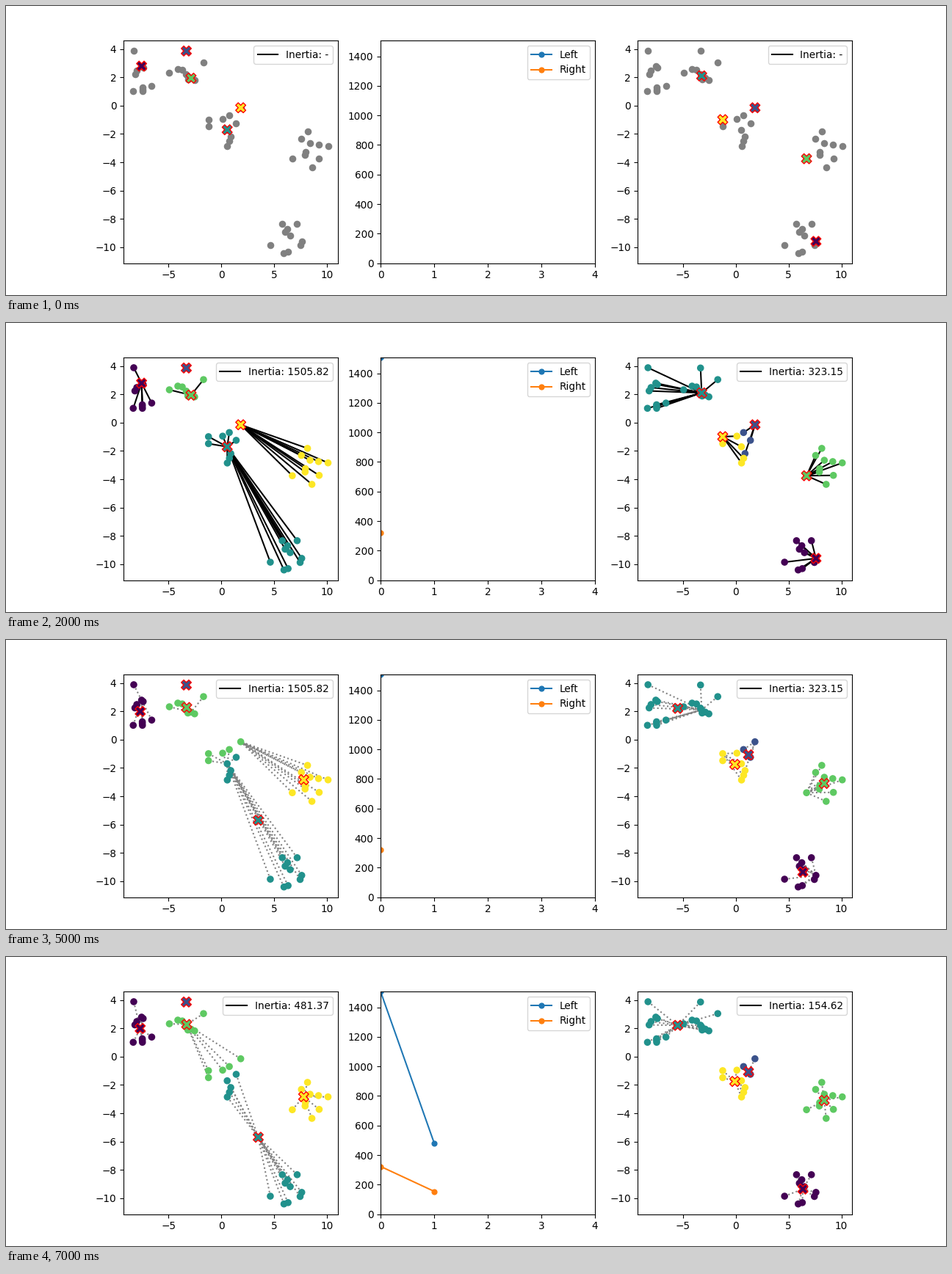
A matplotlib script for the animation above (8000 ms loop, 1280 by 394 pixels).

```python
import numpy as np
import matplotlib.pyplot as plt
from matplotlib.animation import FuncAnimation

W, H = 1280, 394
DPI = W / 13
K = 5

POINTS = np.array([
    # upper left
    (-8.30, 3.89), (-7.56, 2.80), (-7.41, 2.70), (-8.01, 2.49), (-8.19, 2.25),
    (-7.49, 1.27), (-7.49, 1.16), (-7.48, 1.02), (-8.35, 1.02), (-6.60, 1.39),
    # upper middle
    (-3.33, 3.87), (-1.70, 3.05), (-4.93, 2.33), (-4.13, 2.59), (-3.71, 2.53),
    (-3.33, 2.23), (-3.22, 2.11), (-3.18, 1.89), (-2.88, 1.95), (-2.54, 1.83),
    # centre
    (-1.23, -0.985), (-1.23, -1.48), (0.11, -0.95), (0.74, -0.695), (1.39, -1.245),
    (0.54, -1.70), (0.88, -2.18), (0.75, -2.515), (0.55, -2.85), (1.82, -0.145),
    # right
    (8.14, -1.815), (7.56, -2.315), (8.38, -2.655), (9.18, -2.75), (10.08, -2.84),
    (7.94, -3.25), (7.91, -3.485), (6.70, -3.75), (9.24, -3.725), (8.555, -4.36),
    # lower right
    (5.75, -8.345), (7.16, -8.345), (6.25, -8.70), (6.02, -8.945), (6.50, -9.19),
    (7.59, -9.595), (7.44, -9.885), (4.62, -9.865), (6.30, -10.32), (5.91, -10.415),
])

# Steps of the loop: round of the labels, of the centres, of the links, link style
STEPS = [
    (None, 0, None, None),
    (0, 0, None, None),
    (0, 0, 0, "solid"),
    (0, 0, 0, "dotted"),
    (0, 1, 0, "dotted"),
    (1, 1, 0, "dotted"),
    (1, 1, 1, "solid"),
    (1, 1, 1, "dotted"),
]


def kmeans(seeds, rounds=2):
    """Return the centres and labels of each round."""
    centres, history = POINTS[seeds], []
    for _ in range(rounds):
        dist = np.linalg.norm(POINTS[:, None] - centres, axis=2)
        labels = dist.argmin(axis=1)
        history.append((centres, labels))
        centres = np.array([POINTS[labels == k].mean(axis=0) for k in range(K)])
    return history


RUNS = [
    dict(name="Left", history=kmeans([1, 10, 25, 18, 29]), inertia=[1505.82, 481.37]),
    dict(name="Right", history=kmeans([45, 29, 16, 37, 20]), inertia=[323.15, 154.62]),
]

fig, (ax_left, ax_mid, ax_right) = plt.subplots(
    1, 3, figsize=((W + 1e-6) / DPI, (H + 1e-6) / DPI), dpi=DPI)


def draw_clusters(ax, run, step):
    label_round, centre_round, link_round, style = step
    history = run["history"]
    cmap = dict(cmap="viridis", vmin=0, vmax=K - 1)
    ax.clear()

    text = "-"
    if link_round is not None:
        text = f"{run['inertia'][link_round]:.2f}"
        centres, labels = history[link_round]
        color = "black" if style == "solid" else "grey"
        for p, c in zip(POINTS, centres[labels]):
            ax.plot([p[0], c[0]], [p[1], c[1]], color=color, ls=style, zorder=0)

    if label_round is None:
        ax.scatter(*POINTS.T, color="grey")
    else:
        ax.scatter(*POINTS.T, c=history[label_round][1], **cmap)
    ax.scatter(*history[centre_round][0].T, c=range(K), marker="X", s=100,
               edgecolors="red", **cmap)

    ax.plot([], [], color="black", label=f"Inertia: {text}")
    ax.legend(loc="upper right")
    ax.set_xlim(-9.27, 11.0)
    ax.set_ylim(-11.14, 4.6)


def draw_chart(ax, link_round):
    shown = 0 if link_round is None else link_round + 1
    ax.clear()
    for run in RUNS:
        ax.plot(range(shown), run["inertia"][:shown], "o-", ms=5, label=run["name"])
    ax.legend(loc="upper right")
    ax.set_xlim(0, 4)
    ax.set_ylim(0, RUNS[0]["inertia"][0])
    ax.set_xticks(range(5))


def update(i):
    step = STEPS[i]
    draw_clusters(ax_left, RUNS[0], step)
    draw_chart(ax_mid, step[2])
    draw_clusters(ax_right, RUNS[1], step)


anim = FuncAnimation(fig, update, frames=len(STEPS), interval=1000,
                     init_func=lambda: None, repeat=True, repeat_delay=0)
plt.show()
```
